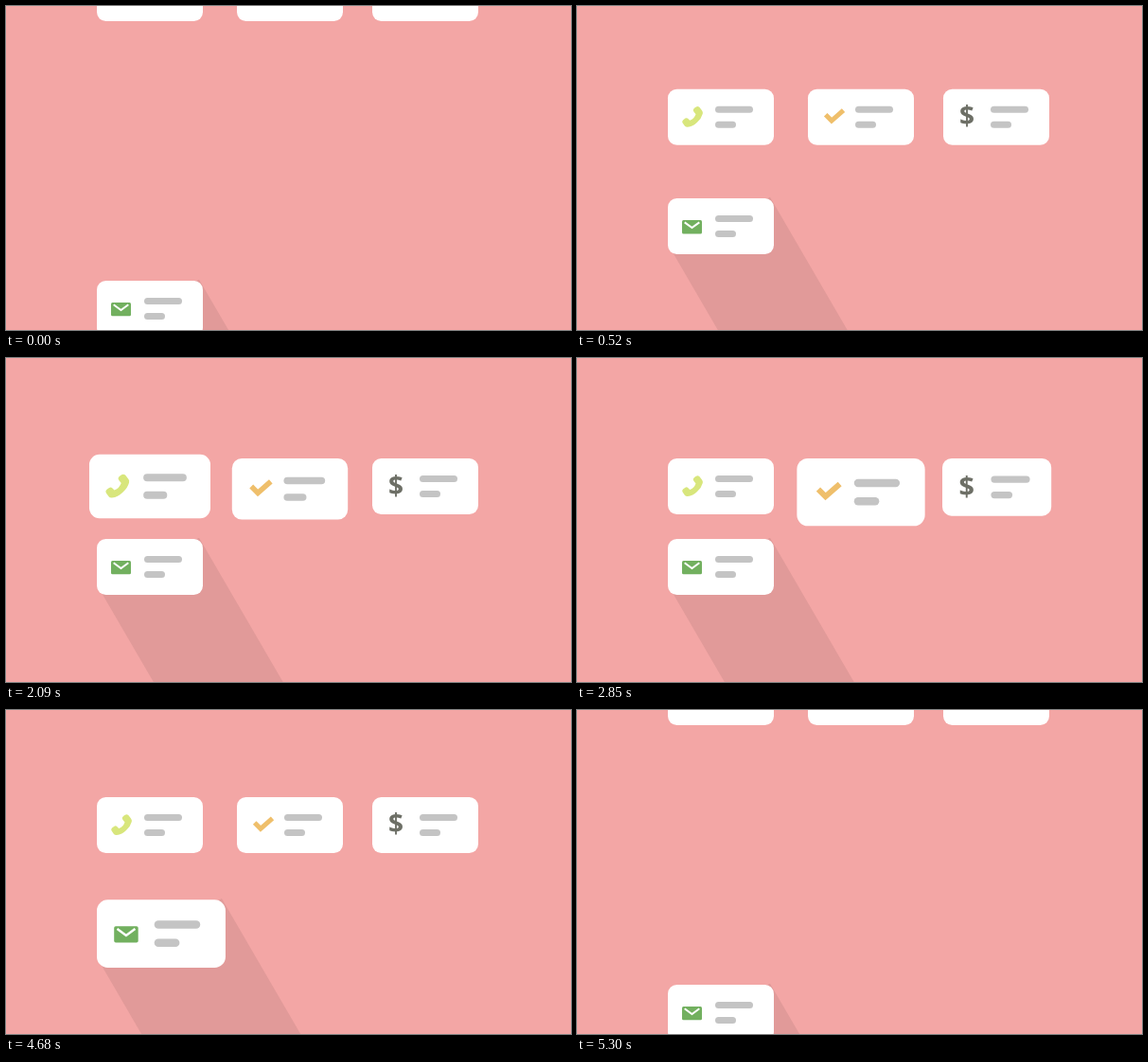
Write an HTML page with a canvas that moves like this. It is 597 px wide and 342 px high and loops after 5560 ms.

```html
<!DOCTYPE html>
<html lang="en">
<head>
<meta charset="utf-8">
<title>Cards</title>
<style>
  html, body { margin: 0; width: 100%; height: 100%; overflow: hidden; background: #f3a6a5; }
  canvas { display: block; width: 597px; height: 342px; }
</style>
</head>
<body>
<canvas id="stage"></canvas>
<script>
const W = 597, H = 342, LOOP = 5560;
const CARD_W = 112, CARD_H = 59, RADIUS = 9.5, GROWTH = 0.236;
const SLANT = 0.582;

const canvas = document.getElementById('stage');
const ctx = canvas.getContext('2d');
const dpr = window.devicePixelRatio || 1;
canvas.width = Math.round(W * dpr);
canvas.height = Math.round(H * dpr);

// Each move runs at constant speed in discrete steps.
const moves = {
  enter:  { from: 130,  to: 680,  lead: 0.094 },
  phone:  { from: 1010, to: 1530, lead: 0.1 },
  check:  { from: 1940, to: 2450, lead: 0.1 },
  dollar: { from: 2850, to: 3380, lead: 0.12 },
  mail:   { from: 3740, to: 4270, lead: 0.1 },
  leave:  { from: 4680, to: 5200, lead: 0.094 }
};

function progress({ from, to, lead }, t) {
  if (t < from) return 0;
  const step = Math.floor((t - from) / (to - from) * 11 + 0.25);
  return Math.min(1, lead + 0.098 * step);
}

function box(x, y, w, h, r, color) {
  ctx.fillStyle = color;
  ctx.beginPath();
  ctx.roundRect(x, y, w, h, r);
  ctx.fill();
}

function line(points, width, color) {
  ctx.strokeStyle = color;
  ctx.lineWidth = width;
  ctx.lineJoin = 'miter';
  ctx.beginPath();
  points.forEach(([x, y]) => ctx.lineTo(x, y));
  ctx.stroke();
}

const handset = new Path2D(
  'M13.3 1.8 Q16 -.8 18.3 1 L21 4.5 Q22.3 6 21.8 8 Q20.5 13 16 17 ' +
  'Q11.5 21.5 6 22 Q4 22.2 3 21 L.6 17.6 Q-.5 16 1 14.6 L3.4 12.8 ' +
  'Q5 11.8 6.2 13 L8.2 15 Q13 13 14.5 8.4 L12.5 6 Q11.3 4.5 12 3.2Z');

const icons = {
  phone() {
    ctx.translate(15, 18);
    ctx.fillStyle = '#d8e67c';
    ctx.fill(handset);
  },
  check() {
    line([[18.7, 27], [25, 33.3], [37.5, 22.3]], 5, '#efbf6b');
  },
  dollar() {
    ctx.font = '700 28px "Open Sans", sans-serif';
    ctx.textAlign = 'center';
    ctx.fillStyle = '#6d6f66';
    const m = ctx.measureText('$');
    const y = 28.5 + (m.actualBoundingBoxAscent - m.actualBoundingBoxDescent) / 2;
    ctx.fillText('$', 25, y);
  },
  mail() {
    box(15, 23, 21, 14.3, 1.5, '#72b05f');
    line([[17.7, 25.3], [25.5, 31], [33.3, 25.3]], 2, '#fff');
  }
};

// pivot: the point of the card, as a fraction of its size, that stays put while it grows
const cards = [
  { icon: 'phone',  x: 96,  hidden: -43, shown: 106, pivot: [0.5, 0.5],  next: 'check' },
  { icon: 'check',  x: 244, hidden: -43, shown: 106, pivot: [0.5, 0],    next: 'dollar' },
  { icon: 'dollar', x: 387, hidden: -43, shown: 106, pivot: [0.31, 0],   next: 'mail' },
  { icon: 'mail',   x: 96,  hidden: 290, shown: 191, pivot: [0, 0],      next: 'leave', shadow: true }
];

function drawShadow(x, y, s) {
  const right = x + CARD_W * s, bottom = y + CARD_H * s;
  const top = y + 5.5, left = x + 6.3;
  const end = H + 10;
  ctx.fillStyle = '#e19a99';
  ctx.beginPath();
  ctx.moveTo(right - 4, top - 4 / SLANT);
  ctx.lineTo(right + (end - top) * SLANT, end);
  ctx.lineTo(left + (end - bottom) * SLANT, end);
  ctx.lineTo(left - 4, bottom - 4 / SLANT);
  ctx.closePath();
  ctx.fill();
}

function drawCard(card, t) {
  const shown = progress(moves.enter, t) - progress(moves.leave, t);
  const grown = progress(moves[card.icon], t) - progress(moves[card.next], t);
  const s = 1 + GROWTH * grown;
  const x = card.x - CARD_W * (s - 1) * card.pivot[0];
  const y = card.hidden + (card.shown - card.hidden) * shown - CARD_H * (s - 1) * card.pivot[1];
  if (card.shadow) drawShadow(x, y, s);
  ctx.save();
  ctx.translate(x, y);
  ctx.scale(s, s);
  box(0, 0, CARD_W, CARD_H, RADIUS, '#fff');
  box(50, 18, 40, 7, 3.5, '#c4c4c4');
  box(50, 34, 22, 7, 3.5, '#c4c4c4');
  icons[card.icon]();
  ctx.restore();
}

function draw(t) {
  ctx.setTransform(dpr, 0, 0, dpr, 0, 0);
  ctx.fillStyle = '#f3a6a5';
  ctx.fillRect(0, 0, W, H);
  cards.forEach(card => drawCard(card, t));
}

const start = performance.now();
function tick() {
  draw((performance.now() - start) % LOOP);
  requestAnimationFrame(tick);
}
tick();
</script>
</body>
</html>
```
